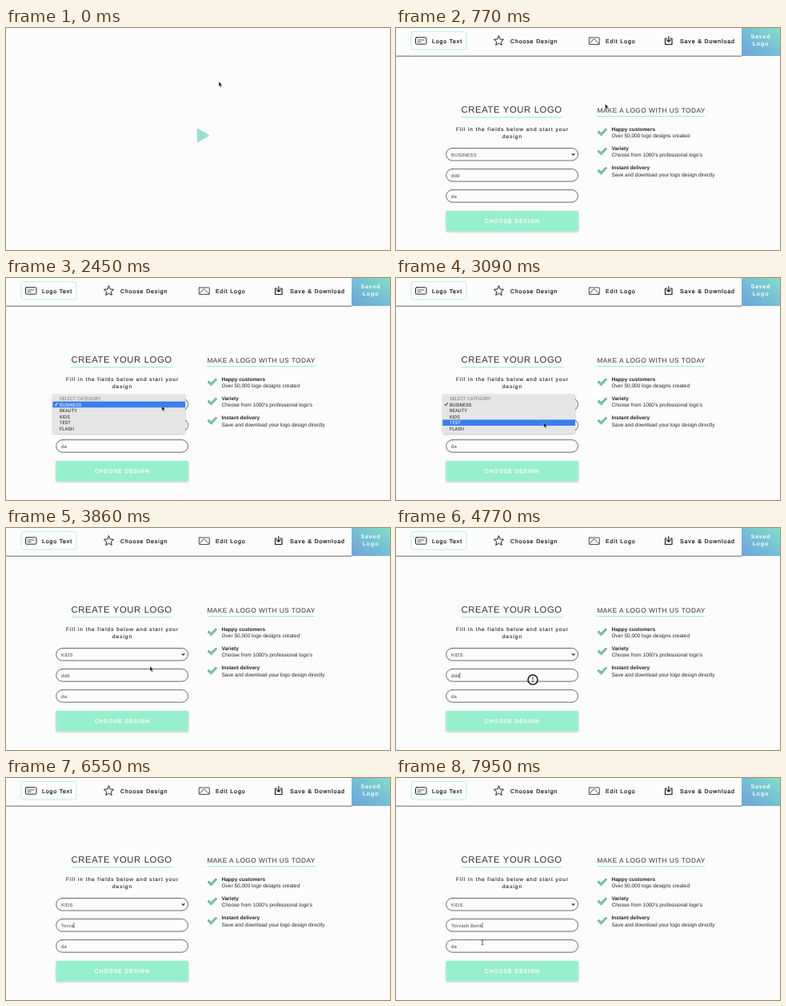
Animation, 480 px wide and 278 px high, one loop 8000 ms. Source, as an HTML page:

```html
<!DOCTYPE html>
<html lang="en">
<head>
<meta charset="utf-8">
<title>Logo form</title>
<style>
  html, body { margin: 0; width: 100%; height: 100%; overflow: hidden; background: #fcfcfd; }
  svg { display: block; width: 100vw; height: 100vh; }
  text { font-family: "Liberation Sans", Arial, sans-serif; text-rendering: geometricPrecision; fill: #222; white-space: pre; }
  .nav text { font-size: 7px; letter-spacing: .87px; fill: #111; stroke: #111; stroke-width: .2; }
  .nav .saved { font-weight: bold; fill: #fff; stroke: none; text-anchor: middle; }
  .line { fill: none; stroke: #222; stroke-width: 1; stroke-linejoin: round; stroke-linecap: round; }
  .fields rect { stroke: #444; stroke-width: .8; }
  .mint { stroke: #98ecce; stroke-width: 1; fill: none; }
  .title { font-size: 11.3px; letter-spacing: .62px; fill: #333; }
  .subtitle { font-size: 8.3px; letter-spacing: .45px; fill: #333; }
  .hint { font-size: 6.5px; letter-spacing: .97px; text-anchor: middle; fill: #222; stroke: #222; stroke-width: .12; }
  .value { font-size: 6px; letter-spacing: .2px; fill: #444; }
  .button { font-size: 6.5px; letter-spacing: 1.09px; fill: #fff; stroke: #fff; stroke-width: .3; }
  .benefit { font-size: 6.5px; }
  .benefit .head { font-weight: bold; }
  #menu text { font: 5.9px Roboto, sans-serif; }
</style>
</head>
<body>
<svg viewBox="0 0 480 278" preserveAspectRatio="none">
  <defs>
    <linearGradient id="savedFill" x1="0" y1="1" x2="1" y2="0">
      <stop offset="0" stop-color="#6ea3dc"/><stop offset=".5" stop-color="#74bfd3"/><stop offset="1" stop-color="#85dfca"/>
    </linearGradient>
    <filter id="shadow" x="-10%" y="-20%" width="120%" height="150%">
      <feDropShadow dx="0" dy=".8" stdDeviation=".9" flood-opacity=".28"/>
    </filter>
  </defs>

  <g id="loader" fill="none" stroke="#3fc9a8" stroke-width=".75"></g>

  <g id="page">
    <g class="nav">
      <path d="M0 35.2H432" stroke="#444" stroke-width=".8"/>
      <rect class="mint" x="19" y="4.5" width="69" height="22.5" rx="3" stroke-opacity=".65"/>
      <g class="line">
        <rect x="24.5" y="11.8" width="13.5" height="8.4" rx="1.3"/>
        <path d="M27 15H35M27 17.4H31" stroke-width=".8"/>
        <path id="star"/>
        <rect x="241.3" y="12" width="13" height="8.5" rx=".8" stroke-width=".8"/>
        <path d="M242 19.5C245 18 245 14 247.5 14S250 18 254 19.5" stroke-width=".8"/>
        <path d="M338.5 13H336.5V20.5H345V13H343M340.8 10.5V17M338.6 15L340.8 17.3L343 15" stroke-width="1.2"/>
      </g>
      <text x="45" y="18.8">Logo Text</text>
      <text x="143" y="18.8">Choose Design</text>
      <text x="262" y="18.8">Edit Logo</text>
      <text x="355" y="18.8">Save &amp; Download</text>
      <rect x="432" width="48" height="35" fill="url(#savedFill)"/>
      <text class="saved" x="456" y="13">Saved</text>
      <text class="saved" x="456" y="22">Logo</text>
    </g>

    <text class="title" x="81.5" y="105.7">CREATE YOUR LOGO</text>
    <path class="mint" d="M81.5 111.7H208.5"/>
    <text class="hint" x="145.5" y="129.3">Fill in the fields below and start your</text>
    <text class="hint" x="145.5" y="138.2">design</text>

    <g class="line fields">
      <rect x="62.7" y="150.5" width="164.8" height="15.5" rx="7.7"/>
      <rect x="62.7" y="176.6" width="164.8" height="15.5" rx="7.7"/>
      <rect x="62.7" y="202.7" width="164.8" height="15.5" rx="7.7"/>
      <path d="M220.2 157.6L221.6 159L223 157.6" stroke-width="1.2"/>
    </g>
    <text class="value" id="category" x="69" y="160.7"></text>
    <text class="value" id="name" x="69" y="186.8"></text>
    <text class="value" x="69" y="213">da</text>
    <path id="caret" stroke="#222" stroke-width=".6"/>

    <rect x="62.5" y="229" width="165.5" height="25.5" rx="1.5" fill="#97f0cd" filter="url(#shadow)"/>
    <text class="button" x="110.8" y="244">CHOOSE DESIGN</text>

    <text class="subtitle" x="251.5" y="105.8">MAKE A LOGO WITH US TODAY</text>
    <path class="mint" d="M251.5 110.6H386.5"/>
    <g id="benefits"></g>

    <g id="menu">
      <rect x="58.3" y="145.5" width="165.7" height="49.3" rx="1.5" fill="#e5e5e5" filter="url(#shadow)"/>
      <rect id="highlight" x="58.3" width="165.7" height="7.6" fill="#397eea"/>
      <path id="tick" d="M61 158.4L62.3 160L64.3 156.4" class="line"/>
    </g>
  </g>

  <g id="pointer">
    <circle id="ring" r="6" fill="#fff" fill-opacity=".5" stroke="#111" stroke-width="1.5"/>
    <path id="arrow" d="M0 0V6.2L1.4 4.9L2.4 7.2L3.5 6.7L2.5 4.5H4.4Z" fill="#111" stroke="#fff" stroke-width=".4"/>
    <path id="beam" d="M-1.2 -2.8Q0 -2.8 0 -2Q0 -2.8 1.2 -2.8M0 -2V2M-1.2 2.8Q0 2.8 0 2Q0 2.8 1.2 2.8" fill="none" stroke="#222" stroke-width=".7"/>
  </g>
</svg>
<script>
const LOOP = 8000, PAGE_AT = 400;
const OPEN_AT = 1850, PICK_AT = 3750, FOCUS_AT = 4650;
const ERASE_AT = 5150, ERASE_STEP = 150, TYPE_AT = 5800, TYPE_STEP = 170;
const HIDE_AT = 5100, RETURN_AT = 7750;
const OLD_NAME = "ddd", NEW_NAME = "Torvash Benk";
const ROW_TOP = 147, ROW_HEIGHT = 7.6;
const options = ["SELECT CATEGORY", "BUSINESS", "BEAUTY", "KIDS", "TEST", "FLASH"];
const benefits = [
  ["Happy customers", "Over 50,000 logo designs created"],
  ["Variety", "Choose from 1000's professional logo's"],
  ["Instant delivery", "Save and download your logo design directly"]
];
// time, x, y
const pointerPath = [
  [0, 266, 67], [250, 266, 67], [770, 261.5, 95], [1200, 246, 125], [1750, 206, 158],
  [2450, 194.7, 160], [3090, 184.7, 181], [3600, 180, 173], [3850, 180, 173],
  [4550, 171, 190], [7600, 171, 190], [7950, 108, 206], [8000, 108, 206]
];

const $ = id => document.getElementById(id);
const show = (id, visible) => $(id).style.display = visible ? "" : "none";
const setText = (id, value) => { if ($(id).textContent !== value) $(id).textContent = value; };

function build() {
  const star = Array.from({ length: 10 }, (_, i) => {
    const r = i % 2 ? 2.9 : 6.4, a = i * Math.PI / 5;
    return `${128.5 + r * Math.sin(a)} ${16.3 - r * Math.cos(a)}`;
  });
  $("star").setAttribute("d", `M${star.join("L")}Z`);

  $("loader").innerHTML = [1, .74, .48, .22].map(s =>
    `<path d="M${244.5 - 4.8 * s} ${134.5 - 8 * s}L${244.5 + 9 * s} 134.5L${244.5 - 4.8 * s} ${134.5 + 8 * s}Z"/>`).join("");

  $("benefits").innerHTML = benefits.map(([head, body], i) => `
    <g class="benefit" transform="translate(0 ${i * 24.2})">
      <path d="M252 130.4L253.8 129L256.3 131.8L262 126L263.5 127L256.6 134.8Z" fill="#6fe0ba" stroke="#34544c" stroke-width=".6"/>
      <text class="head" x="269.5" y="128.8">${head}</text>
      <text x="269.5" y="137.2">${body}</text>
    </g>`).join("");

  $("menu").insertAdjacentHTML("beforeend", options.map((label, i) =>
    `<text class="option" x="67" y="${ROW_TOP + 5.9 + i * ROW_HEIGHT}">${label}</text>`).join(""));
}

function pointerAt(t) {
  const i = Math.max(1, pointerPath.findIndex(p => p[0] > t));
  const [t0, x0, y0] = pointerPath[i - 1], [t1, x1, y1] = pointerPath[i];
  const u = (t - t0) / (t1 - t0), k = u * u * (3 - 2 * u);
  return [x0 + (x1 - x0) * k, y0 + (y1 - y0) * k];
}

function nameAt(t) {
  if (t >= TYPE_AT) return NEW_NAME.slice(0, 1 + Math.floor((t - TYPE_AT) / TYPE_STEP));
  const erased = t < ERASE_AT ? 0 : 1 + Math.floor((t - ERASE_AT) / ERASE_STEP);
  return OLD_NAME.slice(0, Math.max(0, OLD_NAME.length - erased));
}

function drawMenu(open, y) {
  show("menu", open);
  if (!open) return;
  const row = Math.min(5, Math.max(1, Math.floor((y - ROW_TOP) / ROW_HEIGHT)));
  $("highlight").setAttribute("y", ROW_TOP + row * ROW_HEIGHT);
  $("tick").style.stroke = row === 1 ? "#fff" : "#222";
  document.querySelectorAll(".option").forEach((option, i) =>
    option.style.fill = i === row ? "#fff" : i ? "#222" : "#777");
}

function draw(t) {
  const [x, y] = pointerAt(t);
  const loaded = t >= PAGE_AT, open = t >= OPEN_AT && t < PICK_AT;
  show("loader", !loaded);
  show("page", loaded);
  drawMenu(open, y);
  setText("category", t < PICK_AT ? "BUSINESS" : "KIDS");
  setText("name", nameAt(t));

  const focused = t >= FOCUS_AT;
  show("caret", focused);
  if (focused) {
    const end = 69.2 + (nameAt(t) ? $("name").getComputedTextLength() : 0);
    $("caret").setAttribute("d", `M${end} 181V188`);
  }

  const overInput = loaded && !open && x > 62 && x < 228 && ((y > 176 && y < 192) || (y > 202 && y < 218));
  const clicking = [[OPEN_AT - 60, 120], [PICK_AT - 60, 120], [FOCUS_AT, 200]]
    .some(([start, length]) => t >= start && t < start + length);
  show("pointer", t < HIDE_AT || t >= RETURN_AT);
  show("ring", clicking);
  show("arrow", !overInput);
  show("beam", overInput);
  $("pointer").setAttribute("transform", `translate(${x} ${y})`);
}

build();
const start = performance.now();
function tick() {
  draw((performance.now() - start) % LOOP);
  requestAnimationFrame(tick);
}
tick();
</script>
</body>
</html>
```
